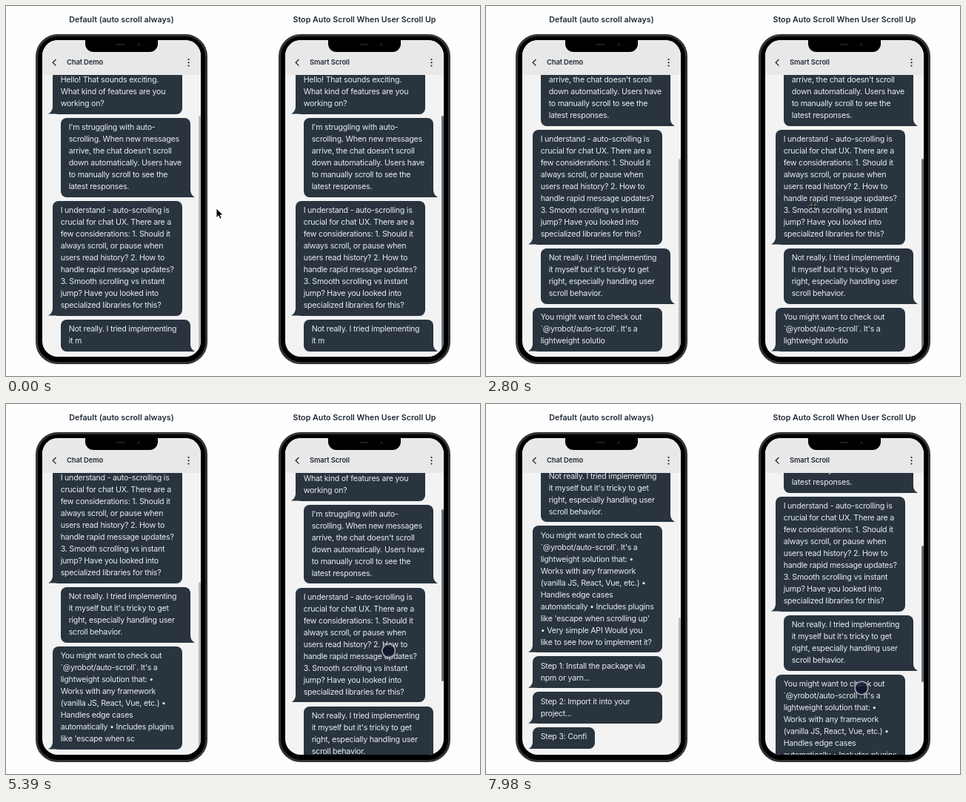
Write an HTML page that moves like this. It is 640x499 px and loops after 8000 ms.

```html
<!DOCTYPE html>
<html lang="en">
<head>
<meta charset="utf-8">
<title>Chat auto scroll</title>
<style>
  html, body { margin: 0; width: 100%; height: 100%; overflow: hidden; background: #fefefe; }
  body { position: relative; font: 10.67px/16px Inter, sans-serif; letter-spacing: -.023em; color: #1f2933; }
  h2 { position: absolute; top: 11px; width: 260px; margin: 0 0 0 -14px; text-align: center; white-space: nowrap;
       font-size: 10.67px; font-weight: 600; line-height: 16px; letter-spacing: .004em; }
  .phone { position: absolute; top: 38px; width: 232px; height: 445px; box-sizing: border-box;
           border: 3px solid #343436; border-radius: 30px; background: #000; }
  .screen { position: absolute; left: 6px; top: 5px; width: 214px; height: 427px; overflow: hidden;
            border-radius: 21px; background: #f3f3f3; }
  .bar { position: absolute; width: 100%; height: 46.5px; background: #e8e8e9; }
  .bar b { position: absolute; left: 33px; top: 22px; font-size: 9.33px; font-weight: 600; letter-spacing: -.01em; }
  .bar svg { position: absolute; left: 0; top: 0; }
  .notch { position: absolute; left: 58px; top: -2px; width: 98px; height: 18px; border-radius: 0 0 11px 11px; background: #000; }
  .notch::before, .notch::after { content: ""; position: absolute; top: 7px; left: 42px; width: 12px; height: 2px;
                                  border-radius: 2px; background: #1d1d20; }
  .notch::after { top: 6px; left: 70px; width: 4px; height: 4px; background: #14182e; }
  .view { position: absolute; top: 46.5px; width: 100%; height: 380.5px; overflow: hidden; }
  .list { position: absolute; left: 14px; width: 186px; display: flex; flex-direction: column; gap: 5.33px; }
  .msg { position: relative; flex: none; align-self: flex-start; box-sizing: border-box; padding: 5.33px 10.67px;
         border-radius: 8px; background: #29343f; color: #e8ecf0; white-space: pre; }
  .msg.user { align-self: flex-end; }
  .msg::after { content: ""; position: absolute; left: -6px; bottom: 0; width: 15px; height: 9px; background: inherit;
                clip-path: path("M6 0Q5.5 6 0 9H15V0Z"); }
  .msg.user::after { left: auto; right: -6px; transform: scaleX(-1); }
  .thumb { position: absolute; right: 0; width: 3px; border-radius: 2px; background: #b4b8bd; }
  .smart .thumb { background: #68707a; }
  #pointer { position: absolute; left: 0; top: 0; overflow: visible; }
</style>
</head>
<body>
<svg id="pointer" width="1" height="1">
  <path id="arrow" d="M0 0V12.5L3 9.8L5 14.2L7.2 13.2L5.2 9H9.2Z" stroke="#fff" stroke-width=".9"/>
  <path id="move" d="M0-6.5L2.8-3.4H1V-1H3.4V-2.8L6.5 0L3.4 2.8V1H1V3.4H2.8L0 6.5L-2.8 3.4H-1V1H-3.4V2.8L-6.5 0L-3.4-2.8V-1H-1V-3.4H-2.8Z"
        stroke="#fff" stroke-opacity=".55" stroke-width=".7"/>
  <circle id="touch" r="8.8" fill="#0e0f28" fill-opacity=".78" stroke="#a6a6b2" stroke-width="1.6"/>
</svg>
<script>
const LOOP = 8000, STEP = 70, LINE = 16, PAD = 10.67, GAP = 5.33;
const VIEW_TOP = 92.5, VIEW_HEIGHT = 380.5, REST = 465.6, DRAG_START = 3800;

const messages = [
  ["user", "Hi! I'm building a chat page\nfor my AI app"],
  ["bot", "Hello! That sounds exciting.\nWhat kind of features are you\nworking on?"],
  ["user", "I'm struggling with auto-\nscrolling. When new messages\narrive, the chat doesn't scroll\ndown automatically. Users have\nto manually scroll to see the\nlatest responses."],
  ["bot", "I understand - auto-scrolling is\ncrucial for chat UX. There are a\nfew considerations: 1. Should it\nalways scroll, or pause when\nusers read history? 2. How to\nhandle rapid message updates?\n3. Smooth scrolling vs instant\njump? Have you looked into\nspecialized libraries for this?"],
  ["user", "Not really. I tried implementing\nit myself but it's tricky to get\nright, especially handling user\nscroll behavior."],
  ["bot", "You might want to check out\n`@yrobot/auto-scroll`. It's a\nlightweight solution that: •\nWorks with any framework\n(vanilla JS, React, Vue, etc.) •\nHandles edge cases\nautomatically • Includes plugins\nlike 'escape when scrolling up'\n• Very simple API Would you\nlike to see how to implement it?"],
  ["bot", "Step 1: Install the package via\nnpm or yarn..."],
  ["bot", "Step 2: Import it into your\nproject..."],
  ["bot", "Step 3: Configure the options"]
];
const FIRST_TYPED = 4;

// Rows are [time, value, ...]
const typedKeys = [[0, 37], [1960, 145], [3710, 241], [4550, 286], [6370, 385], [6700, 403], [6982, 449], [7350, 469], [7980, 500]];
const dragKeys = [[DRAG_START, -89], [4550, -14], [6370, 68], [7350, 8], [7980, -99]];
const pointerKeys = [[1050, 284, 273], [1680, 328, 312], [1960, 328, 312], [3400, 523, 241], [3710, 523, 241],
  [4550, 513, 343], [6370, 521, 321], [7350, 517, 292], [7980, 507, 383]];
const stalls = [[350, 560], [910, 1050], [1680, 1820], [6230, 6370]];

function at(keys, t) {
  let i = 0;
  while (i < keys.length - 2 && t >= keys[i + 1][0]) i++;
  const [a, b] = [keys[i], keys[i + 1]];
  const k = Math.min(1, Math.max(0, (t - a[0]) / (b[0] - a[0])));
  return a.slice(1).map((v, j) => v + (b[j + 1] - v) * k);
}

// A growing last word stays on the line above for as long as it fits
const wrap = text => text.replace(/([^\n]*)\n(\S*)$/, (all, line, word) =>
  line.length + 1 + word.length <= 30 ? line + " " + word : all);

function textsAt(t) {
  let left = t <= 0 ? Math.floor(37 + t * .055) : Math.floor(at(typedKeys, t)[0] + 1e-6);
  return messages.map(([, text], i) => {
    if (i < FIRST_TYPED) return text;
    const part = wrap(text.slice(0, Math.max(0, left)));
    left -= text.length;
    return part;
  });
}

const lineCount = text => text.split("\n").length;
const heightOf = text => text ? Math.max(29.33, lineCount(text) * LINE + PAD) : 0;
const contentHeight = texts => texts.filter(Boolean).reduce((sum, text) => sum + heightOf(text) + GAP, -GAP);

function makePhone(x, heading, name, kind) {
  document.getElementById("pointer").insertAdjacentHTML("beforebegin", `
    <h2 style="left:${x}px">${heading}</h2>
    <div class="phone ${kind}" style="left:${x}px"><div class="screen">
      <div class="view"><div class="list">${messages.map(([who]) => `<div class="msg ${who}"></div>`).join("")}</div>
        <div class="thumb"></div></div>
      <div class="bar"><b>${name}</b><svg width="214" height="46">
        <path d="M18.5 26L14.2 30.3L18.5 34.6" fill="none" stroke="#222" stroke-width="1.3"/>
        <path d="M197.5 26v0M197.5 30.3v0M197.5 34.6v0" stroke="#222" stroke-width="2.2" stroke-linecap="round"/>
      </svg></div>
      <div class="notch"></div>
    </div></div>`);
  const phone = document.querySelector("." + kind);
  const list = phone.querySelector(".list"), thumb = phone.querySelector(".thumb");
  return (texts, origin) => {
    texts.forEach((text, i) => {
      const { style } = list.children[i];
      list.children[i].textContent = text;
      style.display = text ? "" : "none";
      style.height = heightOf(text) + "px";
      style.width = lineCount(text) > 1 ? "175px" : "";
    });
    list.style.top = origin - VIEW_TOP + "px";
    const scale = VIEW_HEIGHT / (contentHeight(texts) + 20);
    thumb.style.top = (VIEW_TOP + 12 - origin) * scale + "px";
    thumb.style.height = VIEW_HEIGHT * scale + "px";
  };
}

const drawDefault = makePhone(40, "Default (auto scroll always)", "Chat Demo", "default");
const drawSmart = makePhone(368, "Stop Auto Scroll When User Scroll Up", "Smart Scroll", "smart");

function drawPointer(t) {
  const [x, y] = at(pointerKeys, t);
  const shape = t < 1400 ? "arrow" : t < DRAG_START ? "move" : "touch";
  for (const el of document.getElementById("pointer").children) {
    el.style.display = el.id === shape ? "" : "none";
    el.setAttribute("transform", `translate(${x} ${y})`);
  }
}

function draw(now) {
  let t = Math.floor(now % LOOP / STEP) * STEP;
  for (const [from, to] of stalls) if (t > from && t < to) t = from;
  const texts = textsAt(t);
  // Scrolling trails the typing slightly
  const follow = REST - contentHeight(textsAt(t - 30));
  drawDefault(texts, follow);
  drawSmart(texts, t < DRAG_START ? follow : at(dragKeys, t)[0]);
  drawPointer(t);
}

let start;
function tick(now) {
  start ??= now;
  draw(now - start);
  requestAnimationFrame(tick);
}
draw(0);
requestAnimationFrame(tick);
</script>
</body>
</html>
```
